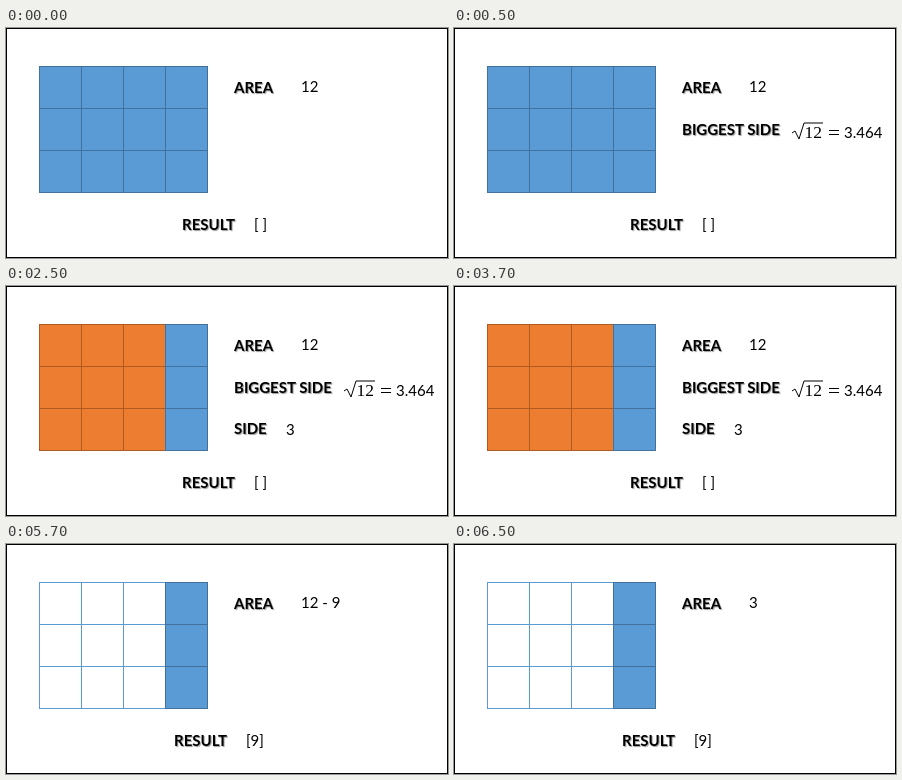
Animation of 442 by 230 pixels, one loop 8 s. Source, as an HTML page:

```html
<!DOCTYPE html>
<html lang="en">
<head>
<meta charset="utf-8">
<title>Largest squares in a rectangle</title>
<style>
html, body { margin: 0; width: 100%; height: 100%; overflow: hidden; background: #fff; }
svg { display: block; }
text { font: 15px Lato, sans-serif; }
.label { font-weight: bold; text-shadow: 1px 1px 1px #0006; }
.math { font: 17px "Noto Serif", serif; }
.radicand { font: 17.5px "Liberation Serif", serif; }
</style>
</head>
<body>
<svg width="442" height="230">
  <rect x=".5" y=".5" width="441" height="229" fill="none" stroke="#000"/>
  <g id="grid"></g>
  <text class="label" x="228" y="65">AREA</text>
  <text id="area" x="295" y="64"></text>
  <g id="root">
    <text class="label" x="228" y="107">BIGGEST SIDE</text>
    <path d="M338 105l3-2 4 8 5-16h19" fill="none" stroke="#000"/>
    <text class="radicand" x="350.5" y="110">12</text>
    <path d="M375 102.5h10m-10 4h10" stroke="#000"/>
    <text x="390" y="110">3.464</text>
  </g>
  <g id="side">
    <text class="label" x="228" y="148">SIDE</text>
    <text x="280" y="149">3</text>
  </g>
  <g id="result">
    <text class="label" x="176" y="202">RESULT</text>
    <text id="list" x="248" y="202"></text>
  </g>
</svg>
<script>
const LOOP = 8000;
const BLUE = ["#5b9bd5", "#41719c"];
const ORANGE = ["#ed7d31", "#ae5a21"];
const EMPTY = ["#fff", "#5b9bd5"];
const steps = [
  { at: 0, square: BLUE, area: "12", list: "[ ]" },
  { at: 500, square: BLUE, area: "12", list: "[ ]", root: true },
  { at: 2500, square: ORANGE, area: "12", list: "[ ]", root: true, side: true },
  { at: 4500, square: EMPTY, area: "12 - 9", list: "[9]", shift: -8 },
  { at: 6500, square: EMPTY, area: "3", list: "[9]", shift: -8 }
];
const $ = id => document.getElementById(id);

const cells = [];
for (let col = 0; col < 4; col++) {
  for (let row = 0; row < 3; row++) {
    const cell = document.createElementNS("http://www.w3.org/2000/svg", "rect");
    const attrs = { x: 33.5 + col * 42, y: 38.5 + row * 42, width: 42, height: 42 };
    for (const name in attrs) cell.setAttribute(name, attrs[name]);
    $("grid").append(cell);
    cells.push({ cell, col });
  }
}

function show(step) {
  for (const { cell, col } of cells) {
    const [fill, stroke] = col < 3 ? step.square : BLUE;
    cell.setAttribute("fill", fill);
    cell.setAttribute("stroke", stroke);
  }
  $("area").textContent = step.area;
  $("list").textContent = step.list;
  $("root").style.display = step.root ? "" : "none";
  $("side").style.display = step.side ? "" : "none";
  $("result").setAttribute("transform", `translate(${step.shift || 0})`);
}

const start = performance.now();
let current;
function tick() {
  const t = (performance.now() - start) % LOOP;
  const step = steps.findLast(s => s.at <= t);
  if (step !== current) show(current = step);
  requestAnimationFrame(tick);
}
tick();
</script>
</body>
</html>
```
